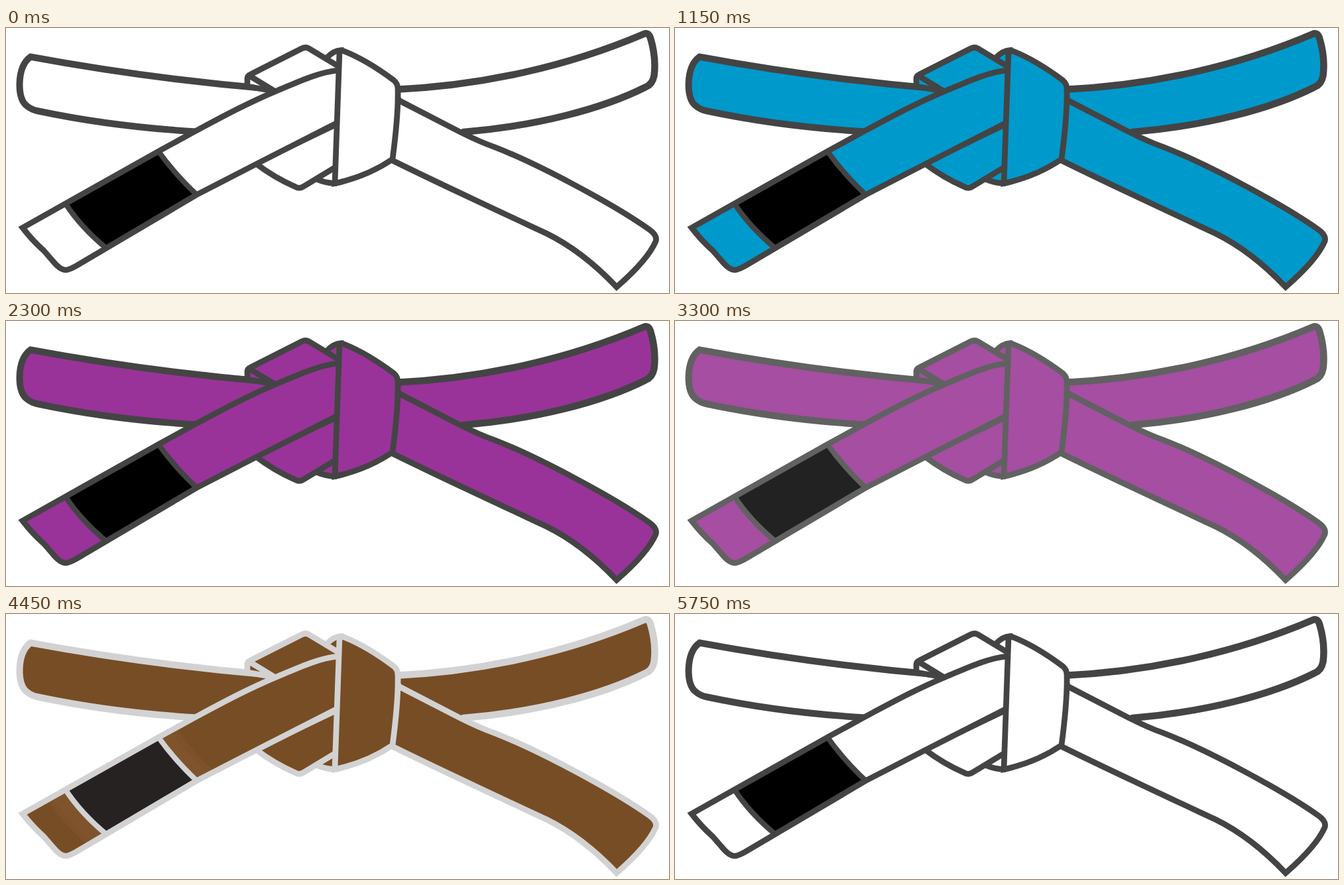
An HTML page for the animation above (5780 ms loop, 1000x400 px).

```html
<!DOCTYPE html>
<html lang="en">
<head>
<meta charset="utf-8">
<title>Belt ranks</title>
<style>
  html, body { margin: 0; width: 100%; height: 100%; overflow: hidden; background: #fff; }
  svg { display: block; width: 100%; height: 100%; }
</style>
</head>
<body>
<svg id="stage" viewBox="0 0 1000 400"></svg>
<script>
const HOLD = 1000, STEP = 30, STEPS = 6, LOOP = 5780;
const STAGE = HOLD + STEP * (STEPS - 1);

const belts = [
  { cloth: '#fff', line: '#444', bar: '#000' },
  { cloth: '#0099cc', line: '#444', bar: '#000' },
  { cloth: '#993399', line: '#444', bar: '#000' },
  { cloth: '#663303', line: '#ccc', bar: '#000' },
  { cloth: '#000', line: '#ccc', bar: '#9a0a08', striped: true }
];

const shapes = {
  leftTail: 'M37 43.5Q212 76 400 92V130L300 158L288 156.5Q160 149 47 125Q38 123 32 118Q20.5 110 20.5 85Q21 55 37 43.5Z',
  rightTail: 'M585 93C720 87 850 57 962 9Q969 6 972 15Q981 45 977.5 72Q975 85 965 89C900 122 800 148 690 157L680 165L600 130Z',
  knotBack: 'M484 45Q494 34 505 33.5V215L496 234.5Q482 234 468 228Z',
  upperLoop: 'M364 88V76Q364 72 369 70L446 31Q452 28 457 31L500 57L510 62V90L408 96Z',
  fold: 'M367 72L408 97',
  lowerLoop: 'M376 204Q405 226 436 239.5Q443 243.5 449 239L497 210L510 203V140Z',
  band: 'M510 63.5L500 64C470 67 437 83 408 95C365 113 330 132 285 156L232 185L25 301.5Q40 321 57 336L70 351Q83 367 92 365Q97 364 106 359L150 333L287 252L384 202L500 143L510 138Z',
  bar: 'M89 264L229.5 185.5Q254 220 288 252L152 333Q113 301 89 264Z',
  dividers: 'M89 264Q113 301 152 333M229.5 185.5Q254 220 288 252',
  frontTail: 'M580 103L592 109L685 157Q715 172 735 179C800 204 915 265 970 304Q983 313 980 322Q968 350 921 391Q870 337 815 310C740 275 660 238 583 200L570 190Z',
  knot: 'M503 36Q502 33 510 35Q545 49 585 79Q591 84 591 92Q592 130 583 198Q545 224 496 234.5Z'
};

const path = (d, fill, stroke = 'none', width = 8.7) =>
  `<path d="${d}" fill="${fill}" stroke="${stroke}" stroke-width="${width}"/>`;

// Stripe lying along a divider, dx and dy wide.
const stripe = (x, y, dx, dy, fill) =>
  path(`M${x} ${y}q24 36 60 67l${dx} ${dy}q-36 -31 -60 -67z`, fill);

const stripes = () =>
  stripe(89.5, 265, -27, 16, '#ccc') + stripe(89.5, 265, -20, 12, '#fff') +
  stripe(229.5, 185, 26, -14, '#ccc') + stripe(229.5, 185, 18, -9.5, '#fff');

function drawBelt({ cloth, line, bar, striped }) {
  const piece = (name, width) => path(shapes[name], cloth, line, width);
  return '<g>' +
    piece('leftTail', 10) + piece('rightTail', 10.5) + piece('knotBack') +
    piece('upperLoop') + path(shapes.fold, 'none', line) + piece('lowerLoop') +
    path(shapes.band, cloth) + (striped ? stripes() : '') + path(shapes.bar, bar) +
    path(shapes.dividers, 'none', line, 8) + path(shapes.band, 'none', line) +
    piece('frontTail') + piece('knot') + '</g>';
}

// Earlier belts lie above later ones.
const stage = document.getElementById('stage');
stage.innerHTML = belts.map(drawBelt).reverse().join('');
const layers = [...stage.children].reverse();

function render(now) {
  const t = now % LOOP;
  const index = Math.floor(t / STAGE) % belts.length;
  const since = t % STAGE - HOLD;
  const mix = since < 0 ? 0 : (Math.floor(since / STEP) + 1) / STEPS;
  const next = (index + 1) % belts.length;
  layers.forEach((layer, i) => {
    const alpha = i === index ? 1 - mix : i === next ? mix : 0;
    layer.setAttribute('opacity', alpha);
  });
}

function tick(now) {
  render(now);
  requestAnimationFrame(tick);
}
render(0);
requestAnimationFrame(tick);
</script>
</body>
</html>
```
